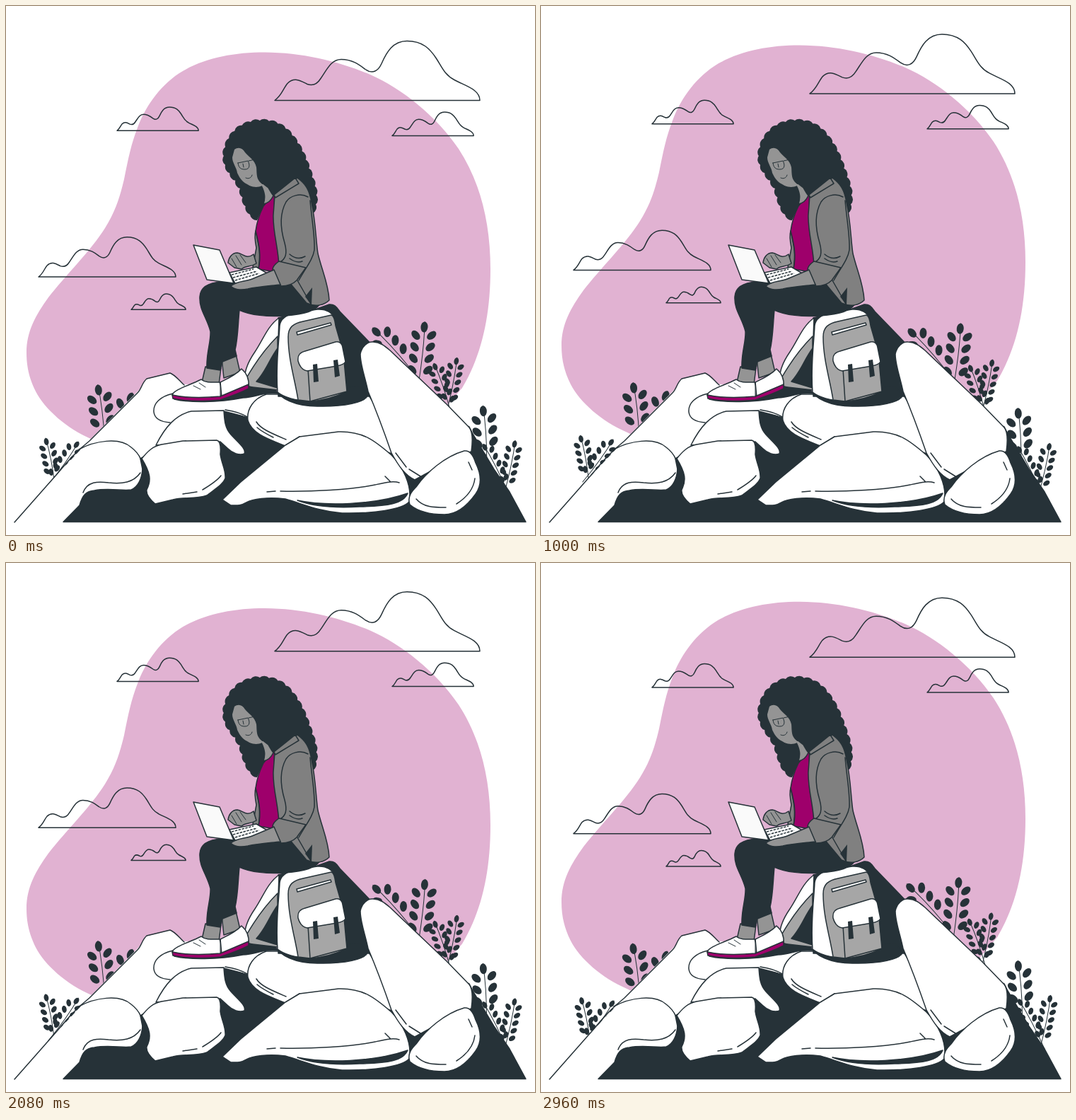
An HTML page that plays this animation: 748x748 px, repeating every 3000 ms.

```html
<!DOCTYPE html>
<html lang="en">
<head>
<meta charset="utf-8">
<title>Working outdoors</title>
<style>
  html, body { margin: 0; width: 100%; height: 100%; overflow: hidden; background: #fff; }
  svg { display: block; width: 100vw; height: 100vh; }
  path, ellipse { fill: none; stroke: #263238; stroke-width: 1.5; stroke-linejoin: round; stroke-linecap: round; }
  .white { fill: #fff; }
  .screen { fill: #fafafa; }
  .dark { fill: #263238; }
  .coat { fill: #808080; }
  .skin { fill: #949494; }
  .bag { fill: #a6a6a6; }
  .accent { fill: #9e006b; }
  .bare { stroke: none; }
  .thin { stroke-width: 1; }
  .keys { stroke-width: 1.5; stroke-dasharray: 3.5 1.5; stroke-linecap: butt; }
  #blob { fill: #e1b2d2; stroke: none; }
  #clouds path { vector-effect: non-scaling-stroke; }
</style>
</head>
<body>
<svg viewBox="0 0 748 748">
  <path id="blob" d="M366 65.5C420 66 470 78 515 97C560 117 608 155 640 202C670 248 685 305 685 372C685 440 672 495 645 540L560 640H190C165 632 140 622 122 613C85 597 55 570 42 545C32 525 29 508 29 490C29 460 42 437 60 412C85 380 120 346 140 314C155 290 161 270 167 245C173 215 177 195 186 172C196 145 215 115 245 95C278 74 320 65.5 366 65.5Z"/>
  <g id="clouds"></g>
  <g id="plants"></g>

  <g id="mountain">
    <path class="white bare" d="M12 730L70 665L115 617L190 541L197 528L232 519L252 535L345 540L385 552L345 590L190 650L81 729Z"/>
    <path d="M12 730L72 662C88 643 100 629 118 615L186 547C192 541 192 533 199 527L232 519C240 522 245 530 252 536"/>
    <path class="dark" d="M81 729.5L104 706C108 692 113 686 125 685C145 681 165 686 177 684C187 680 192 668 193 655L190 640L308 573L343 582L400 560L510 540L655 595L660 605L690 655L712 687L735 729.5Z"/>
    <path d="M103 627C125 615 160 609 177 624C190 634 194 645 193 660M109 688C115 672 130 672 145 674C165 676 180 674 190 660"/>
    <path class="white bare" d="M236 548C218 552 208 562 209 574C210 583 218 588 232 589L262 573L312 571L343 582L350 560L390 548L300 540Z"/>
    <path d="M236 548C218 552 208 562 209 574C210 583 218 588 232 589M310 571C325 573 335 577 343 582"/>
    <path class="white" d="M212 621C225 595 240 578 262 573L308 572C309 585 309 596 318 606C328 617 340 626 337 633C330 636 320 632 314 626L303 616Z"/>
    <path class="white" d="M192 640C200 630 208 622 220 620L250 615L298 614C303 615 304 622 303 634C305 648 311 656 310 668C307 676 297 682 284 692C268 698 250 694 236 698L211 704C204 698 198 690 199 684C206 670 204 660 192 640Z"/>
    <path d="M304 664C298 672 288 678 278 684M270 687L250 690"/>
    <path class="white" d="M342 586C340 570 350 555 368 549L512 549C525 570 545 600 550 634L470 612L415 609L395 622C370 612 348 605 342 586Z"/>
    <path d="M354 588C360 598 375 604 396 613M355 596C362 602 370 606 378 610"/>
    <path class="white" d="M306 698L332 673L395 621L415 609L470 602C505 601 522 615 545 635C560 650 575 678 570 701C560 712 520 718 475 717C440 714 420 704 395 697C370 694 348 697 340 702C332 707 325 706 318 706Z"/>
    <path class="dark" d="M412 699C450 707 520 706 568 689C562 704 540 707 500 708C465 710 435 708 412 699Z"/>
    <path d="M369 687L381 686M388 686C430 687 490 684 522 677C535 674 547 671 556 674M536 665L543 672"/>
    <path class="dark" d="M385 441L440 428L457 422C465 421 468 427 472 432L525 487V552H385Z"/>
    <path class="white" d="M501 492C503 482 511 474 519 475C529 475 536 481 543 487L623 563L655 596C660 602 660 615 658 630L625 640L600 658L578 670C565 664 556 652 545 632C536 606 526 578 512 545C508 525 501 508 501 492Z"/>
    <path d="M551 632L566 652M570 655L586 665"/>
    <path class="white" d="M571 705C567 694 574 686 580 680C594 660 620 637 648 629C656 628 661 636 664 646C671 660 674 676 664 690C654 704 640 719 620 719C600 719 583 715 571 705Z"/>
    <path d="M663 668C661 685 648 697 637 704M580 697C590 709 605 709 622 709M654 645L659 656"/>
    <path class="dark" d="M238 556C260 548 320 545 345 534L386 541V548C365 545 355 553 335 554C300 561 258 561 238 556ZM380 541C386 555 410 566 440 566C475 567 512 561 511 549L500 538Z"/>
  </g>

  <g id="backpack">
    <path class="white" d="M386 441C370 452 363 473 352 489C343 502 336 518 338 531L384 500Z"/>
    <path class="bag" d="M384 467C368 483 352 505 340 526C337 534 340 538 349 539L384 543Z"/>
    <path class="dark" d="M384 484C372 500 368 516 354 531L384 540Z"/>
    <path class="white" d="M384 546C381 510 386 475 387 452C388 443 396 437 408 434L440 429C453 428 463 434 465 444L474 480L482 544C470 552 450 558 430 559C412 558 394 554 384 546Z"/>
    <path class="bag" d="M399 468C399 454 406 449 420 446L460 437C464 438 465 444 466 452L474 480L482 545C468 552 448 558 430 559L413 557C409 530 399 500 399 468Z"/>
    <path class="white" d="M411 461L459 448L460 451L412 465Z"/>
    <path class="bag" d="M427 513L478 502L482 545L430 559Z"/>
    <path class="white" d="M413 502C412 493 416 490 423 488L466 475C472 474 475 477 476 483L480 503C478 507 470 509 462 510L426 516C418 515 415 509 413 502Z"/>
    <path class="dark bare" d="M434 507L440 506L442 531L435 532ZM463 501L469 500L472 523L465 525Z"/>
  </g>

  <g id="woman">
    <path class="skin" d="M282 510L277 532L301 535L304 512ZM305 498L308 526L331 518L325 492Z"/>
    <path class="white" d="M235 550C238 542 258 537 276 528C282 533 292 532 302 532C306 540 305 548 303 555C278 556 254 556 235 550Z"/>
    <path class="white" d="M303 532C315 526 326 521 333 513C340 519 344 528 343 538L305 553Z"/>
    <path class="accent" d="M235 550C258 555 280 554 303 552L343 535V541C330 548 318 552 303 557C280 559 252 559 236 555Z"/>
    <path class="thin" d="M303 532L303 552M265 537L275 542M273 533L282 539"/>
    <path class="dark" d="M274 411C275 396 288 391 305 390L395 386C420 390 440 400 446 418C440 432 420 436 395 438C370 440 345 437 330 430C328 450 328 470 324 486L326 495L306 503L303 515L284 512C283 490 290 475 289 460C284 440 273 430 274 411Z"/>
    <path class="dark bare" id="hair" d="M355 303C341 296 337 280 331 258C325 243 306 232 308 209C313 177 335 162 362 162C392 162 405 180 420 208C427 225 431 238 436 252C440 268 440 280 434 293"/>
    <path class="coat" d="M353 318C356 335 361 345 357 372L349 369L354 342C352 332 351 325 353 318Z"/>
    <path class="accent" d="M364 283L379 265C381 300 378 330 390 362L380 376L357 372C361 352 358 338 353 318C355 303 359 293 364 283Z"/>
    <path class="skin" d="M362 250L371 257C374 262 376 266 378 268C375 275 370 279 364 280C367 271 366 264 361 254Z"/>
    <path class="coat" d="M380 268L412 243C424 252 429 260 432 278C438 305 438 330 441 350C447 375 456 393 457 416C450 423 438 426 425 420L405 396L386 370C386 345 377 320 378 295Z"/>
    <path class="coat" d="M379 267L409 243L414 251L381 271Z"/>
    <path d="M427 270C416 264 402 268 396 277C386 295 388 315 394 335C398 350 396 358 386 363M430 275C432 300 437 325 436 345C434 358 424 370 414 388M401 351C408 357 416 358 423 354M401 357C408 362 414 363 419 361M412 388L432 423"/>
    <path class="dark bare" d="M433 398L432 423L423 411Z"/>
    <path class="coat" d="M386 361C380 365 377 369 377 373L389 396C397 396 405 394 411 388L424 370Z"/>
    <path class="skin" d="M314 363C315 355 320 349 327 349C335 350 340 359 350 351L354 364C345 370 340 366 333 372L323 370Z"/>
    <path class="thin" d="M319 357L326 369M325 353L333 366M331 352L339 363"/>
    <path class="white" d="M316 377L354 369L371 379L325 394Z"/>
    <path class="keys" d="M319 380L350 372M321 384L355 375M324 388L358 378"/>
    <path class="screen" d="M265 338L302 345L322 392L284 387Z"/>
    <path class="skin" d="M318 396C326 389 338 390 348 386L379 373L388 394C370 396 355 397 342 400C332 402 322 401 318 396Z"/>
    <path class="skin bare" d="M323 203C328 199 334 200 338 207C343 213 352 218 354 228C355 238 353 246 364 253C358 257 348 257 341 252C333 248 330 242 327 236C326 228 320 222 320 214Z"/>
    <path class="thin" d="M328 222L342 219C345 224 345 231 338 231C332 231 329 229 328 222ZM343 219L352 217M335 223L336 228M339 243C343 245 347 243 348 239"/>
  </g>
</svg>
<script>
  const LOOP = 3000;
  const SWAY = 1500;
  const SWAY_DELAY = 500;
  const BLOB_RISE = 15;
  const CLOUD_RISE = 14.4;
  const byId = id => document.getElementById(id);

  function add(parent, tag, attrs) {
    const node = document.createElementNS('http://www.w3.org/2000/svg', tag);
    for (const key in attrs) node.setAttribute(key, attrs[key]);
    return parent.appendChild(node);
  }

  // One silhouette serves every cloud, placed by its left end.
  function cloud(x, y, scale) {
    add(byId('clouds'), 'path', {
      d: 'M0 0C10 -7 12 -17 18 -24C28 -34 38 -27 46 -23C54 -20 60 -23 65 -31C74 -44 80 -58 94 -58C110 -58 120 -50 128 -44C138 -37 146 -41 151 -52C158 -68 167 -84 187 -84C210 -84 220 -72 228 -60C236 -48 240 -36 254 -29C268 -21 290 -16 290 0Z',
      transform: `translate(${x} ${y}) scale(${scale})`
    });
  }
  cloud(380, 133.5, 1);
  cloud(46, 383, .669);
  cloud(157, 176.3, .397);
  cloud(546, 183.4, .397);
  cloud(177, 429.3, .266);

  // A sprig grows from its base and fills its stem with pairs of leaves.
  function sprig(x, y, lean, height, size) {
    const g = add(byId('plants'), 'g', { transform: `translate(${x} ${y}) rotate(${lean})` });
    const leaf = (cx, cy, tilt) => add(g, 'ellipse', {
      class: 'dark bare', cx, cy, rx: size * .37, ry: size * .56, transform: `rotate(${tilt} ${cx} ${cy})`
    });
    add(g, 'path', { class: 'thin', d: `M0 12Q3 ${-height / 2} 0 ${-height}` });
    leaf(0, size * .56 - height, 0);
    for (let rise = height - size * 1.5; rise > size * .3; rise -= size * 1.22) {
      leaf(-size * .8, -rise, -45);
      leaf(size * .85, -rise - size * .15, 45);
    }
  }
  const BIG = 13.5, SMALL = 9;
  sprig(138, 602, -7, 67, BIG);
  sprig(168, 575, 21, 30, BIG);
  sprig(562, 502, -43, 64, BIG);
  sprig(584, 525, 6, 79, BIG);
  sprig(679, 632, -4, 67, BIG);
  sprig(67, 667, -11, 57, SMALL);
  sprig(67, 667, 35, 62, SMALL);
  sprig(625, 563, -19, 61, SMALL);
  sprig(625, 563, 11, 67, SMALL);
  sprig(706, 681, 12, 68, SMALL);
  sprig(706, 681, -27, 69, SMALL);

  // Turns a smooth outline into a chain of shallow outward arcs.
  function curl(path, width) {
    const total = path.getTotalLength();
    const count = Math.round(total / width);
    const r = width * .72;
    let d = path.getAttribute('d').match(/^M[\d ]+/)[0];
    for (let i = 1; i <= count; i++) {
      const p = path.getPointAtLength(total * i / count);
      d += `A${r} ${r} 0 0 1 ${p.x} ${p.y}`;
    }
    path.setAttribute('d', d + 'L412 262L380 270L364 283Z');
  }
  curl(byId('hair'), 13);

  const triangle = u => 1 - Math.abs(1 - 2 * u);

  // Goes 0 → 1 → -1 → 0, turning at one and three quarters.
  const swing = u => 2 * triangle((u + .25) % 1) - 1;

  function draw(t) {
    const u = Math.max(0, t - SWAY_DELAY) % SWAY / SWAY;
    byId('clouds').setAttribute('transform', `translate(0 ${-CLOUD_RISE * triangle(t / LOOP)})`);
    byId('blob').setAttribute('transform', `translate(0 ${-BLOB_RISE * triangle(u)})`);
    byId('plants').setAttribute('transform', `rotate(${swing(u)} 390 567)`);
  }

  const start = performance.now();
  function tick() {
    draw((performance.now() - start) % LOOP);
    requestAnimationFrame(tick);
  }
  draw(0);
  requestAnimationFrame(tick);
</script>
</body>
</html>
```
